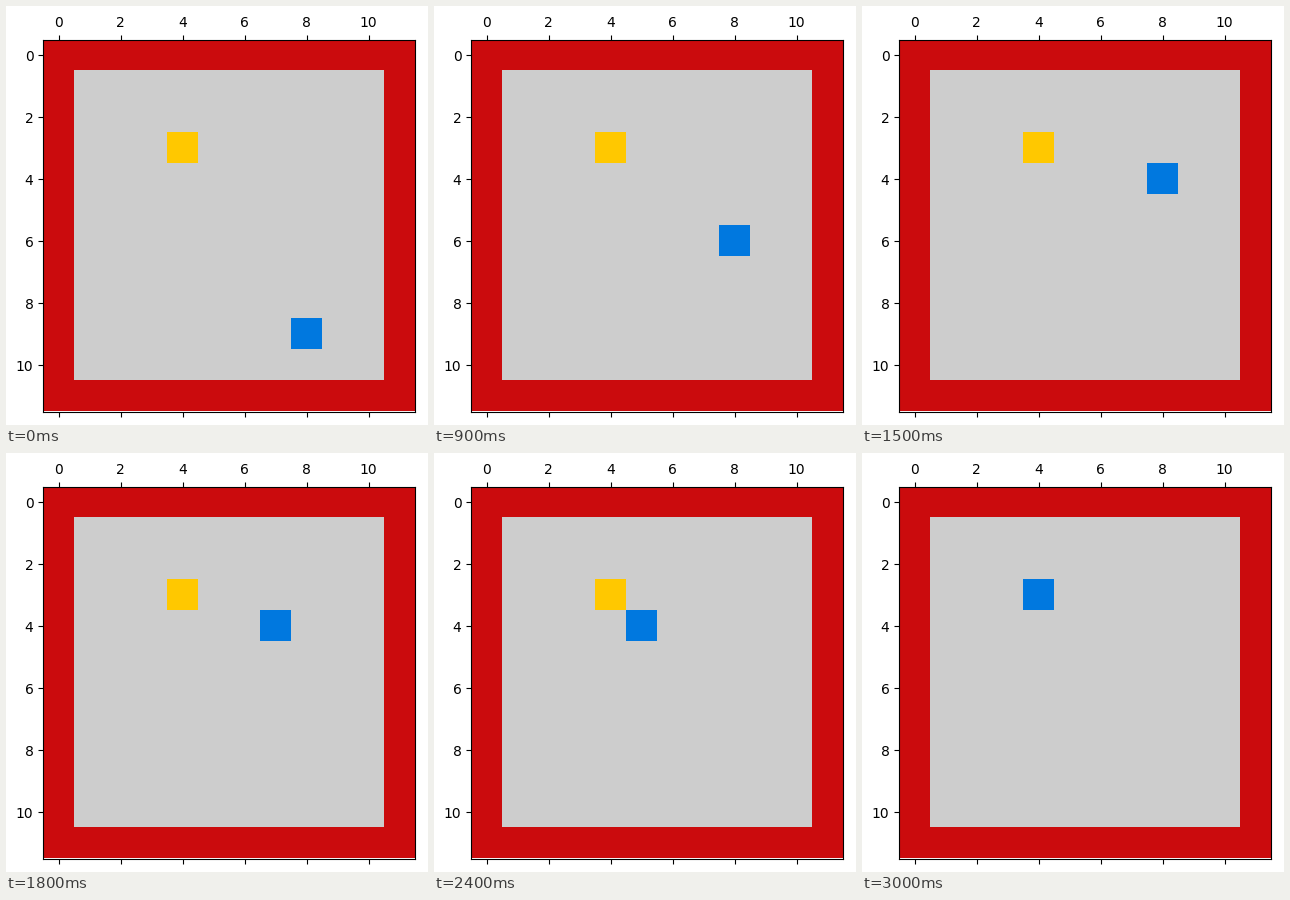
A matplotlib script for the animation above (3.3 s loop, 422 px wide and 419 px high).

```python
import numpy as np
import matplotlib.pyplot as plt
from matplotlib.animation import FuncAnimation

WIDTH, HEIGHT, DPI = 422, 419, 100
LEFT, BOTTOM, SIDE = 37.12, 13.45, 371.99
CELLS = 12
STEP_MS = 300

# The grid sits a hair above its frame, so it snaps one pixel row higher.
LIFT = 0.1 * CELLS / SIDE

WALL = (203, 11, 13)
FLOOR = (205, 205, 205)
GOAL = (255, 200, 0)
AGENT = (0, 120, 223)

GOAL_CELL = (3, 4)
START = (9, 8)
MOVES = "UUUUULLLUL"


def walk(start, moves):
    """Return every (row, column) the agent visits."""
    row, col = start
    path = [start]
    for move in moves:
        if move == "U":
            row -= 1
        else:
            col -= 1
        path.append((row, col))
    return path


def board(agent_cell):
    grid = np.full((CELLS, CELLS, 3), WALL, dtype=np.uint8)
    grid[1:-1, 1:-1] = FLOOR
    grid[GOAL_CELL] = GOAL
    grid[agent_cell] = AGENT
    return grid


path = walk(START, MOVES)

fig = plt.figure(figsize=(WIDTH / DPI, HEIGHT / DPI), dpi=DPI, facecolor="white")
ax = fig.add_axes([LEFT / WIDTH, BOTTOM / HEIGHT, SIDE / WIDTH, SIDE / HEIGHT])
low, high = -0.5, CELLS - 0.5
image = ax.matshow(board(path[0]), extent=(low, high, high - LIFT, low - LIFT))
ax.set_ylim(high, low)


def update(step):
    image.set_data(board(path[step]))
    return [image]


anim = FuncAnimation(fig, update, frames=len(path), interval=STEP_MS,
                     repeat=True, repeat_delay=0, blit=False)
plt.show()
```
